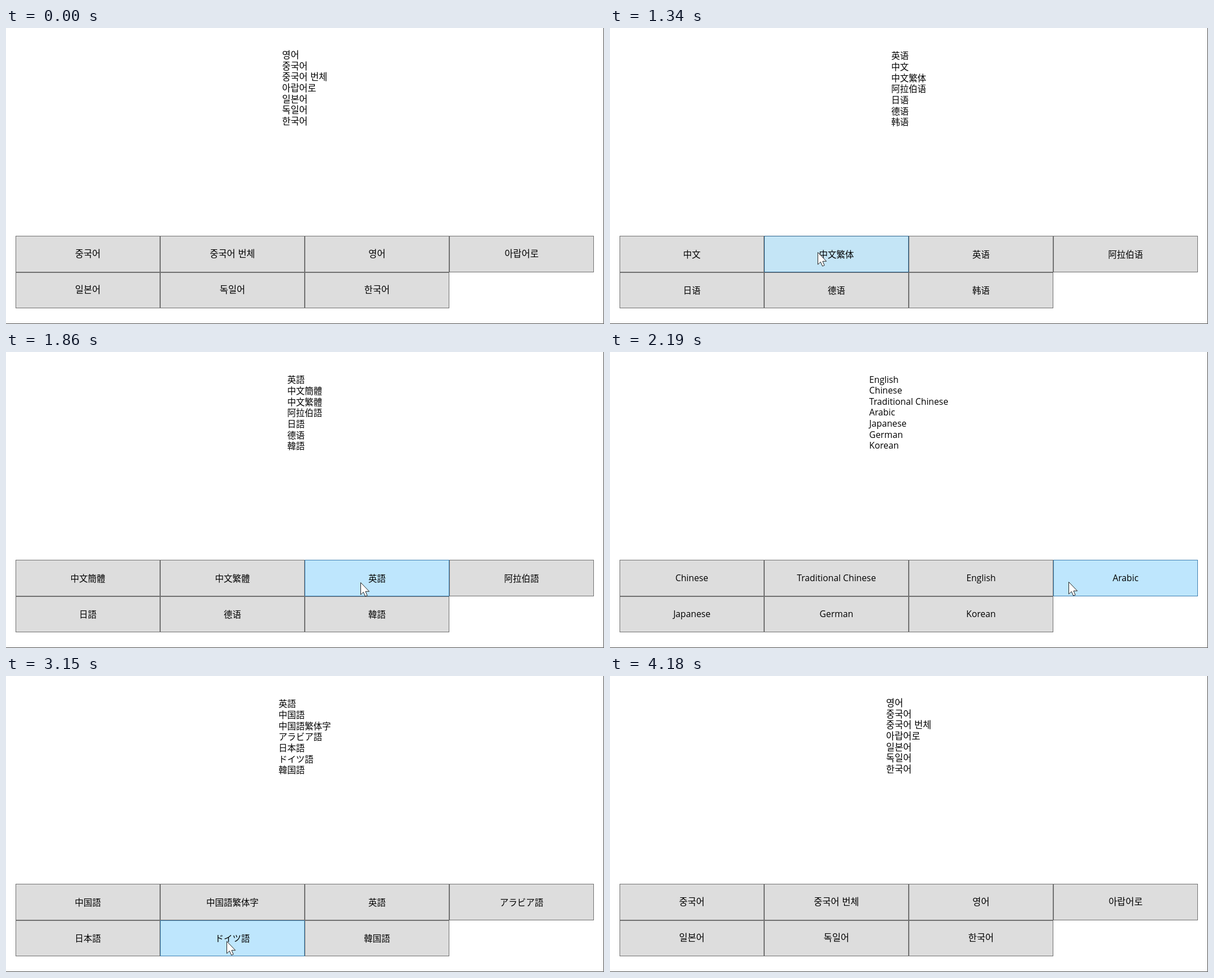
Animation, 1063 px wide and 527 px high, one loop 4700 ms. Source, as an HTML page:

```html
<!DOCTYPE html>
<html lang="ko">
<head>
<meta charset="utf-8">
<title>Language switcher</title>
<style>
  html, body { margin: 0; width: 100%; height: 100%; overflow: hidden; background: #fff; }
  svg { display: block; width: 1063px; height: 527px; }
  text { fill: #000; white-space: pre; }
  .ko { font: 16.5px "Noto Sans CJK KR", "Noto Sans CJK", sans-serif; }
  .zh { font: 15.5px "Noto Sans CJK SC", "Noto Sans CJK", sans-serif; }
  .tw { font: 15.5px "Noto Sans CJK TC", "Noto Sans CJK", sans-serif; }
  .ja { font: 15.5px "Noto Sans CJK JP", "Noto Sans CJK", sans-serif; }
  .en, .de { font: 15.75px "Open Sans", "Noto Sans", sans-serif; }
  .ar { font: 15.6px "DejaVu Sans", sans-serif; }
</style>
</head>
<body>
<svg id="stage" viewBox="0 0 1063 527" xmlns="http://www.w3.org/2000/svg">
  <rect width="1063" height="527" fill="#fff"/>
  <g id="buttons"></g>
  <g id="labels"></g>
  <path d="M1062.5 0V526.5H0" fill="none" stroke="#4a4a4a"/>
  <path id="cursor" d="M.5 .5V22L5.3 17.5L8.7 25L12.2 23.5L9 16.3H15.7Z" fill="#fff" stroke="#222" stroke-width="1"/>
</svg>
<script>
const LOOP = 4700;
const CENTER = 531, LINE = 19.65, LABEL_DROP = 353.6;
const $ = id => document.getElementById(id);

// Names in list order: English, Chinese, traditional, Arabic, Japanese, German, Korean
const LANGS = {
  ko: { base: 54, names: "영어|중국어|중국어 번체|아랍어로|일본어|독일어|한국어" },
  zh: { base: 55.3, names: "英语|中文|中文繁体|阿拉伯语|日语|德语|韩语" },
  tw: { base: 55.3, names: "英語|中文簡體|中文繁體|阿拉伯語|日語|德语|韓語" },
  en: { base: 54.5, names: "English|Chinese|Traditional Chinese|Arabic|Japanese|German|Korean" },
  ar: { base: 54.2, names: "الإنكليزية|الصينية|الصينية التقليدية|العربية|اليابانية|الألمانية|الكورية" },
  ja: { base: 55.3, names: "英語|中国語|中国語繁体字|アラビア語|日本語|ドイツ語|韓国語" },
  de: { base: 54.5, names: "Englisch|Das ist chinesisch|Und das ist chinesisch|Auf arabisch|Japanisch|Das ist Deutsch|Koreanisch" }
};
const BUTTON_ORDER = [1, 2, 0, 3, 4, 5, 6];

// Each click: press time, release time, language chosen
const CLICKS = [
  [730, 810, "zh"], [1340, 1420, "tw"], [1900, 1980, "en"], [2350, 2430, "ar"],
  [2950, 3030, "ja"], [3350, 3430, "de"], [3900, 3980, "ko"]
];

// Pointer path: time, x, y
const PATH = [
  [100, 880, 512], [180, 800, 425], [220, 690, 410], [300, 350, 402], [410, 148, 402],
  [850, 148, 402], [1090, 366, 398], [1260, 366, 398], [1300, 369, 399],
  [1480, 369, 399], [1780, 627, 409], [1820, 627, 409], [1860, 630, 410],
  [2020, 630, 410], [2270, 900, 408], [2450, 900, 408], [2550, 480, 502], [2630, 120, 492], [2790, 135, 470],
  [3030, 135, 470], [3150, 392, 472], [3480, 392, 472], [3700, 561, 469], [3860, 625, 466],
  [3980, 625, 466], [4160, 650, 497]
];
const LEAVE = 4180;

const STYLES = {
  idle: ["#dddddd", "#707070"],
  hover: ["#bee6fd", "#3c7fb1"],
  pressed: ["#c4e5f6", "#2c628b"]
};

function add(parent, tag, attrs, text = "") {
  const node = document.createElementNS("http://www.w3.org/2000/svg", tag);
  for (const key in attrs) node.setAttribute(key, attrs[key]);
  node.textContent = text;
  return parent.appendChild(node);
}

const buttons = BUTTON_ORDER.map((_, i) => {
  const x = 17 + 257 * (i % 4), row = Math.floor(i / 4);
  const y = row ? 435 : 370, h = row ? 64 : 65;
  const rect = add($("buttons"), "rect", { x: x + .5, y: y + .5, width: 256, height: h - 1 });
  return { x, y, h, row, rect };
});

for (const code in LANGS) {
  const lang = LANGS[code], names = lang.names.split("|");
  lang.group = add($("labels"), "g", { class: code });
  const lines = names.map((name, i) =>
    add(lang.group, "text", { y: lang.base + i * LINE }, name));
  const width = Math.max(...lines.map(line => line.getComputedTextLength()));
  lines.forEach(line => line.setAttribute("x", CENTER - width / 2));
  buttons.forEach((b, i) => add(lang.group, "text", {
    x: b.x + 128.5, y: lang.base + LABEL_DROP + b.row * 64, "text-anchor": "middle"
  }, names[BUTTON_ORDER[i]]));
}

function pointerAt(t) {
  if (t < PATH[0][0] || t >= LEAVE) return null;
  const next = PATH.findIndex(p => p[0] > t);
  if (next < 0) return PATH[PATH.length - 1].slice(1);
  const [t0, x0, y0] = PATH[next - 1], [t1, x1, y1] = PATH[next];
  const k = (t - t0) / (t1 - t0);
  return [Math.round(x0 + (x1 - x0) * k), Math.round(y0 + (y1 - y0) * k)];
}

function render(t) {
  const pos = pointerAt(t);
  const down = CLICKS.some(([press, release]) => t >= press && t < release);
  const current = CLICKS.reduce((code, c) => t >= c[1] ? c[2] : code, "ko");

  for (const code in LANGS)
    LANGS[code].group.style.display = code === current ? "" : "none";

  for (const b of buttons) {
    const over = pos && pos[0] >= b.x && pos[0] < b.x + 257 && pos[1] >= b.y && pos[1] < b.y + b.h;
    const [fill, stroke] = STYLES[over ? (down ? "pressed" : "hover") : "idle"];
    b.rect.setAttribute("fill", fill);
    b.rect.setAttribute("stroke", stroke);
  }

  $("cursor").style.display = pos ? "" : "none";
  if (pos) $("cursor").setAttribute("transform", `translate(${pos})`);
}

const start = performance.now();
function tick() {
  render((performance.now() - start) % LOOP);
  requestAnimationFrame(tick);
}
render(0);
requestAnimationFrame(tick);
</script>
</body>
</html>
```
